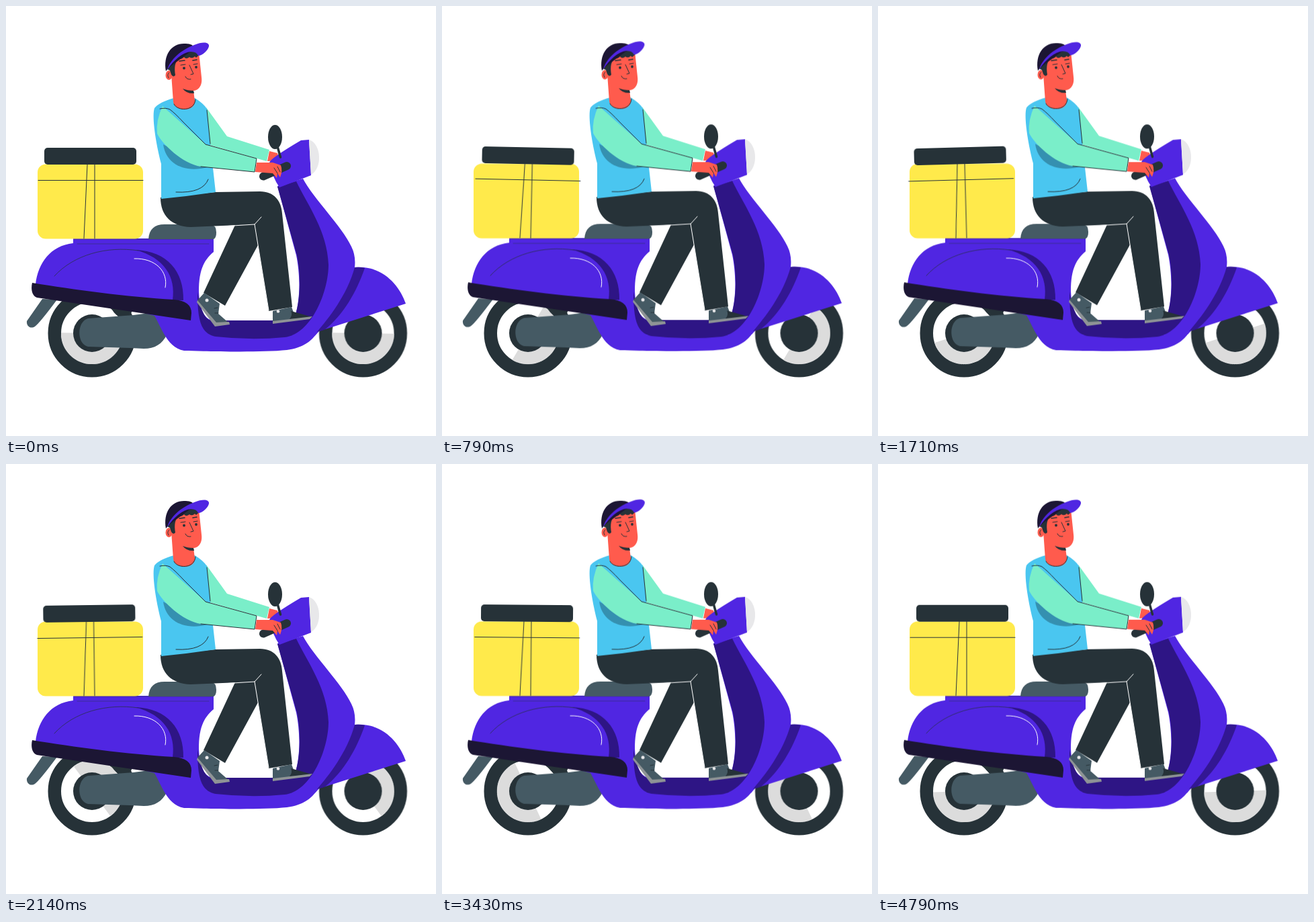
An HTML page without scripts that plays this animation: 640 px wide and 640 px high, repeating every 4.87 s.

```html
<!DOCTYPE html>
<html lang="en">
<head>
<meta charset="utf-8">
<title>Delivery scooter</title>
<style>
  html, body { margin: 0; width: 100%; height: 100%; overflow: hidden; background: #fff; }
  svg { display: block; width: 100vw; height: 100vh; }
  .dark { fill: #263238; }
  .slate { fill: #455a64; }
  .violet { fill: #5026e2; }
  .deep { fill: #2e1585; }
  .navy { fill: #1c1634; }
  .skin { fill: #ff5b4d; }
  .sleeve { fill: #7aeec9; }
  .shirt { fill: #4ac6f0; }
  .line { fill: none; stroke: #263238; stroke-width: 1; stroke-linecap: round; stroke-linejoin: round; }
  .pale { stroke: #fff; }

  .spin { fill: #dcdcdc; animation: spin 4.87s steps(61) -25ms infinite; }
  .bob { animation: bob 4.87s linear infinite; }
  .sway { transform-origin: 126px 347px; animation: sway 2.395s linear infinite; }
  .visor { transform-origin: 240px 94px; animation: tip 2.395s linear infinite; }

  @keyframes spin { from { transform: rotate(1deg); } to { transform: rotate(6220deg); } }
  @keyframes bob {
    0% { transform: translateY(0); }
    16% { transform: translateY(-.7px); }
    28% { transform: translateY(-.5px); }
    44% { transform: translateY(-1px); }
    70%, 100% { transform: translateY(-1.3px); }
  }
  @keyframes sway {
    0%, 50%, 100% { transform: rotate(0); }
    25% { transform: rotate(1.8deg); }
    75% { transform: rotate(-1.8deg); }
  }
  @keyframes tip {
    0%, 50%, 100% { transform: rotate(0); }
    25% { transform: rotate(-1.6deg); }
  }
</style>
</head>
<body>
<svg viewBox="0 0 640 640">
  <path class="slate bob" d="M54 436L31 469C30 477 37 481 43 477Q50 472 76 437Z"/>

  <g transform="translate(128 487)">
    <circle r="55.750" fill="none" stroke="#263238" stroke-width="19.500"/>
    <path class="spin" d="M-46 0A46 46 0 0 0 46 0Z"/>
    <circle class="dark" r="28"/>
  </g>
  <g transform="translate(531.5 487)">
    <circle r="55.750" fill="none" stroke="#263238" stroke-width="19.500"/>
    <path class="spin" d="M-46 0A46 46 0 0 0 46 0Z"/>
    <circle class="dark" r="28"/>
  </g>

  <g class="bob">
    <!-- engine -->
    <path class="dark" d="M158 452H188Q186 464 173 463Q163 462 158 452Z"/>
    <path class="slate" d="M122 465L190 460L220 456L240 488C233 503 222 510 205 510L185 509L122 507C105 503 105 470 122 465Z"/>

    <!-- scooter shell -->
    <path class="violet" d="M44 414C48 382 66 357 100 353V346H309V366C292 380 287 398 287 425Q288 467 310 468H428C439 440 438 400 432 371L404 268L442 257C458 287 500 328 514 358Q521 372 519 389C560 385 586 416 595 443L466 484C456 495 448 508 418 512C380 516 300 514 265 513C240 508 233 482 221 461Z"/>
    <path class="deep" d="M404 269L432 261C450 298 478 335 480 385C480 425 455 488 415 493Q365 498 312 492C290 488 285 468 285 426Q292 466 305 468H428C439 440 439 400 433 371Z"/>
    <path class="deep" opacity=".85" d="M519 389Q527 388 534 390C522 425 502 460 474 482L463 485C480 465 508 430 519 389Z"/>
    <path class="deep" d="M193 363C240 365 265 395 264 438H248C253 403 236 375 193 363Z"/>
    <path class="line" d="M72 402C101 370 150 357 197 364" opacity=".7"/>
    <path class="line" d="M102 347H308M106 354H302" opacity=".45"/>
    <path class="line pale" d="M191 376C222 375 242 395 237 419"/>
    <path class="navy" d="M39 412C100 422 180 433 250 437Q276 439 276 457L275 468L46 434C38 431 37 420 39 412Z"/>
    <path class="slate" d="M212 347C213 332 221 325 236 325H304Q313 326 313 337Q313 345 309 347Z"/>

    <!-- delivery box -->
    <rect x="47" y="235.5" width="157" height="111" rx="12" fill="#ffea4b"/>
    <g class="sway">
      <path class="line" d="M48 259.500H204M121 236L116 346M132 236V346"/>
      <rect class="dark" x="57" y="211" width="137" height="25" rx="5"/>
    </g>

    <!-- far limbs -->
    <path class="sleeve" d="M298 151L329 194L392 214L388 231L303 207Z"/>
    <path class="skin" d="M392 216L404 219L407 230L389 231Z"/>
    <path class="dark" d="M341 326L370 324L375 356L326 446L294 427Z"/>
    <path class="slate" d="M295 427L318 443L316 458L332 472L311 474L285 438Z"/>
    <path d="M285 438L313 471L332 470L333 474L311 477L284 441Z" fill="#8f9496"/>
    <path class="line" d="M310 450L315 449M311 457L316 457"/>
    <circle cx="299" cy="438" r="2.500" fill="#e8e8ea"/>

    <!-- handlebar -->
    <path class="violet" d="M392 233Q393 227 439 200L451 199L454 252L407 270Q397 256 392 233Z"/>
    <path d="M451 199C470 205 471 242 454 251Z" fill="#e8e8ea"/>
    <ellipse class="dark" cx="400.500" cy="195" rx="10.500" ry="18"/>
    <path class="line" d="M404 209L408.500 225" style="stroke-width:3.500"/>
    <path class="line" d="M383 253.500L418 238" style="stroke-width:12"/>

    <!-- near leg -->
    <path class="slate" d="M397 454L425 448L428 456L455 464L397 471Z"/>
    <path class="dark" d="M424 454L456 463L422 466Q427 460 424 454Z"/>
    <path d="M397 469L456 462L452 466L397 473Z" fill="#8f9496"/>
    <circle cx="405" cy="454.500" r="2.300" fill="#e8e8ea"/>
    <path class="dark" d="M230 285L312 277L378 276C399 276 410 290 411 309L426 448L391 454L370 325L275 329C246 328 230 312 230 285Z"/>
    <path class="line pale" d="M322 328L370 325L380 314M370 325L391 453"/>

    <!-- torso -->
    <path class="shirt" d="M231 287V235C222 200 217 163 221 152Q228 143 250 137H281Q294 145 299 153L304 205L312 277Q272 283 231 287Z"/>
    <path class="line" d="M299 155L304 205M253 277Q293 279 301 258"/>
    <path d="M234 206C238 235 265 249 300 240Z" fill="#3590b0"/>
    <path class="sleeve" d="M233 149L297 206L373 227L370 247L290 239C263 235 232 205 225 190Q223 170 233 149Z"/>
    <path class="line" d="M229 153Q238 151 244 154Q252 160 264 173L297 206L373 227L370 247L290 239"/>
    <path class="skin" d="M373 233L397 233L409 237Q412 245 408 255L404 249L403 256L397 249L371 247Z"/>
    <path class="line" d="M399 241L404 249M404 239L408 247"/>

    <!-- head -->
    <path class="skin" d="M245 88L262 68H287L291 106C293 121 284 126 279 126L281 141C283 157 252 159 249 143Z"/>
    <path class="line" d="M250 146C255 157 281 157 282 139"/>
    <path class="dark" d="M263 123Q270 126 279 126L280 130Q269 131 263 123Z"/>
    <ellipse class="skin" cx="242.500" cy="103" rx="5" ry="7"/>
    <path class="line" d="M243 99Q239 102 242 107"/>
    <path class="dark" d="M240 94L246 80L262 66H284Q290 73 285 75Q283 78 281 75Q277 79 273 76Q268 80 265 76Q260 80 257 79Q249 85 252 103Q249 107 246 102L244 96Z"/>
    <circle class="dark" cx="265" cy="92.500" r="1.900"/>
    <circle class="dark" cx="283" cy="91" r="1.900"/>
    <path class="line" d="M273 88L279 101L275 102M267 105Q269 110 275 109M260 88L267 87M279 87L285 86"/>
    <path class="line" d="M258 82L266 81M278 81L284 80" style="stroke-width:1.600"/>
    <path class="navy" d="M238 97C234 74 245 56 265 56Q278 55 281 63L242 92Z"/>
    <path class="violet visor" d="M240 95C244 80 261 65 280 58C294 52 303 54 302 60C301 66 292 74 286 74Q284 68 275 68C263 69 250 80 240 95Z"/>
  </g>
</svg>
</body>
</html>
```
